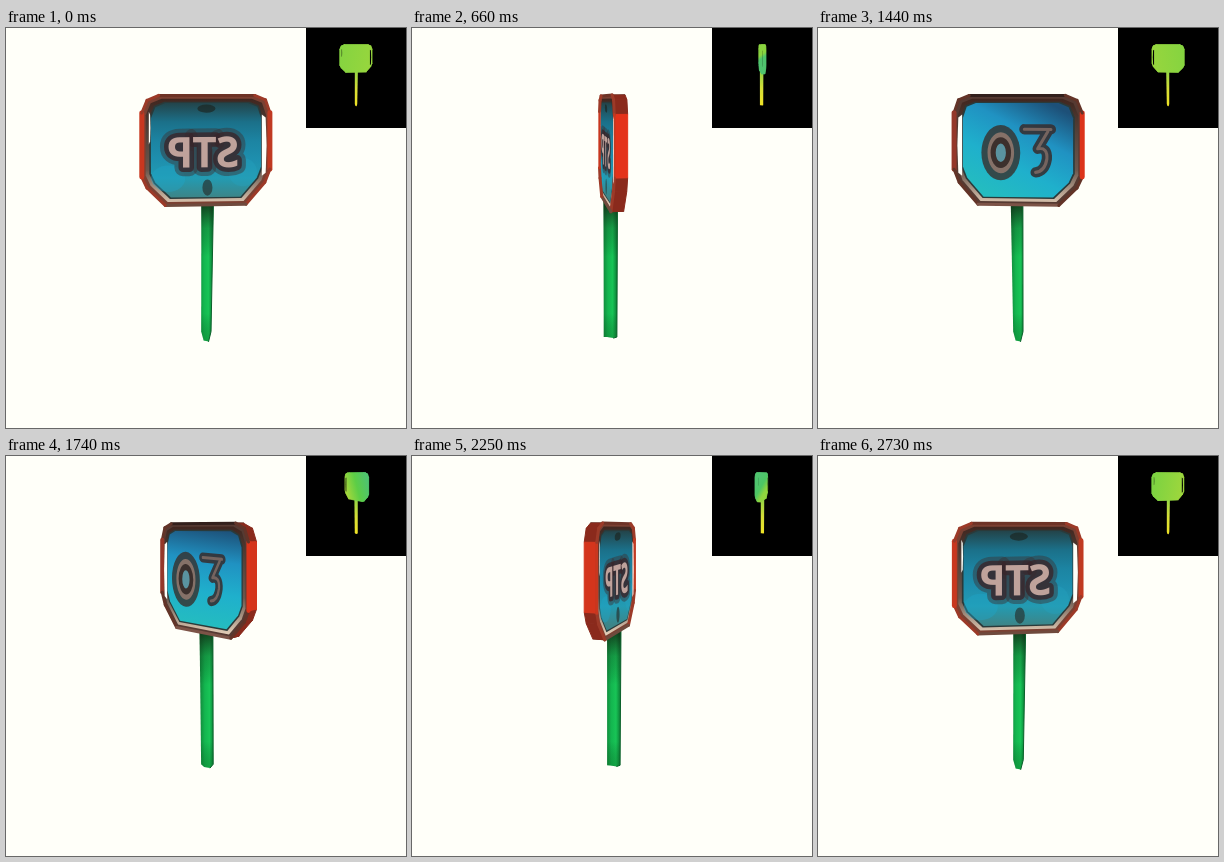
Animation, 400 px wide and 400 px high, one loop 2760 ms. Source, as an HTML page with a canvas:

```html
<!DOCTYPE html>
<html lang="en">
<head>
<meta charset="utf-8">
<title>Turning sign</title>
<style>
html, body { margin: 0; width: 100%; height: 100%; overflow: hidden; background: #fffff9; }
canvas { display: block; width: 100vw; height: 100vh; }
</style>
</head>
<body>
<canvas id="stage" width="400" height="400"></canvas>
<script>
const ctx = document.getElementById('stage').getContext('2d');
const LOOP = 2760, STEP = 30, PAPER = '#fffff9';
const DISTANCE = 490, TILT = 0.1, THICK = 6, CENTER = { x: 200, y: 121.5 };

// Unit outline, clockwise from the left end of the top edge.
const OUTLINE = [
  [-.74, -1], [.76, -1], [.93, -.92], [1, -.68], [1, .36], [.92, .6],
  [.62, 1], [-.64, 1], [-.92, .68], [-1, .48], [-1, -.68], [-.92, -.91],
];
// Edge colours: top, right, bottom, left, and the corners between them.
const WALLS = { edges: ['#3d2019', '#e4321a', '#5a3026', '#d4351c'], corner: '#8a2a1c' };
const FRONT_FRAME = { edges: ['#6e3326', '#c03a22', '#6f4a3d', '#c8371f'], corner: '#9c3a28' };
const BACK_FRAME = { edges: ['#33201c', '#94382a', '#7c5347', '#dc341a'], corner: '#633428' };
const edgeColor = (palette, i) => i % 3 ? palette.corner : palette.edges[i / 3];

let cos, sin, half;

function setPose(time) {
  const angle = time / LOOP * 2 * Math.PI - 0.07;
  cos = Math.cos(angle);
  sin = Math.sin(angle);
  half = 57.5 + 6 * cos ** 6;
}

// u runs along the panel, v down, w out of its front.
function project(u, v, w) {
  const x = u * cos - w * sin, z = u * sin + w * cos;
  const k = DISTANCE / (DISTANCE - z);
  return [CENTER.x + x * k, CENTER.y + (v + z * TILT) * k, z];
}

const outline = (w, size = 1) =>
  OUTLINE.map(([u, v]) => project(u * half * size, v * 54 * size, w));

function trace(points) {
  ctx.beginPath();
  points.forEach(([x, y]) => ctx.lineTo(x, y));
  ctx.closePath();
}

function fill(points, color) {
  trace(points);
  ctx.fillStyle = color;
  ctx.fill();
}

function line(points, color, width) {
  ctx.beginPath();
  points.forEach(([x, y]) => ctx.lineTo(x, y));
  ctx.strokeStyle = color;
  ctx.lineWidth = width;
  ctx.stroke();
}

function blend(x0, y0, x1, y1, colors) {
  const g = ctx.createLinearGradient(x0, y0, x1, y1);
  colors.forEach((c, i) => g.addColorStop(i / (colors.length - 1), c));
  return g;
}

function blot(x, y, rx, ry, color) {
  ctx.fillStyle = color;
  ctx.beginPath();
  ctx.ellipse(x, y, rx, ry, 0, 0, 7);
  ctx.fill();
}

// Draw in flat panel coordinates; side is 1 for the front, -1 for the back.
function onPanel(side, w, paint) {
  const [x, y] = project(0, 0, w), right = project(side, 0, w), down = project(0, 1, w);
  ctx.save();
  ctx.transform(right[0] - x, right[1] - y, down[0] - x, down[1] - y, x, y);
  paint();
  ctx.restore();
}

function poleShape() {
  const edge = Math.abs(sin), x = 200 - 1.7 * sin, lean = 1.3 * cos;
  const top = 6 + edge, bottom = 4.8 + 1.8 * edge;
  const tip = 310 + 3.5 * cos * cos, shoulder = tip - 1 - 9 * cos ** 4;
  return [[x - top + lean, 172], [x + top + lean, 172], [x + bottom, shoulder],
    [x + bottom * .5, tip], [x - bottom * .5, tip - 1], [x - bottom, shoulder]];
}

function drawPole() {
  const shape = poleShape(), x = 200 - 1.7 * sin;
  fill(shape, blend(x - 7, 0, x + 7, 0, ['#128a3c', '#13b64f', '#18c456', '#0b7a34']));
  fill(shape, blend(0, 172, 0, 314, ['#10200fe8', '#12351b44', '#0000', '#0000', '#0000', '#0a601c55']));
  line(shape.slice(1, 4), '#0a612a', 1);
}

function frontArt() {
  blot(0, -41, 9, 4, '#1c2420aa');
  blot(-38, 28, 17, 13, '#1fa6c866');
  blot(36, 22, 14, 14, '#25a2c055');
  blot(1, 37, 5, 8, '#26312daa');
  ctx.scale(-1, 1);
  ctx.font = 'bold 42px "Open Sans", sans-serif';
  ctx.letterSpacing = '-1px';
  ctx.textAlign = 'center';
  const lettering = [['#3a333577', 17], ['#38262acc', 9]];
  for (const [color, width] of lettering) {
    ctx.strokeStyle = color;
    ctx.lineWidth = width;
    ctx.strokeText('STP', 3, 17);
  }
  ctx.fillStyle = '#bfa29b';
  ctx.fillText('STP', 3, 17);
}

function backArt() {
  blot(-16, 2, 19, 27, '#38302ccc');
  blot(-16, 2, 13, 20, '#857168');
  blot(-16, 2, 10, 15, '#3c302d');
  blot(-16, 2, 5, 9, '#5a93a0');
  const numeral = new Path2D('M7 -21H33M30 -19L20 -2Q30 -4 29 8Q27 20 18 21');
  ctx.lineCap = 'round';
  ctx.strokeStyle = '#372e2fdd';
  ctx.lineWidth = 10;
  ctx.stroke(numeral);
  ctx.strokeStyle = '#75645f';
  ctx.lineWidth = 3;
  ctx.stroke(numeral);
}

// Open slits between the panel and its side bars.
function drawSlits(w, color) {
  const slit = (u, from, to, width) =>
    fill([project(u - width, from, w), project(u + width * .6, from + 3, w),
      project(u + width, (from + to) / 2, w), project(u + width * .6, to - 3, w),
      project(u - width, to, w)], color);
  slit(half * .91, -35, 26, 2.4);
  if (w > 0) slit(-half * .88, -38, -6, .8);
}

function drawFace(side) {
  const w = side * THICK, rim = outline(w), field = outline(w, .86);
  const front = side > 0;
  fill(rim, front ? '#7a4032' : '#563a32');
  fill(outline(w, .94), blend(0, 70, 0, 178, ['#40261f', '#54423a', '#6a564c', '#e2cdb7']));
  fill(outline(w, .885), '#2a3a3a');
  const xs = field.map(([x]) => x), left = Math.min(...xs), right = Math.max(...xs);
  fill(field, front
    ? blend(0, 75, 0, 169, ['#23444a', '#1b7089', '#1c84a2', '#1e8fae', '#239bb2', '#3c8588'])
    : blend(left + 30, 168, right - 30, 72, ['#24bcc0', '#1fb0cc', '#2092c2', '#1d5078']));

  ctx.save();
  trace(outline(w, .9));
  ctx.clip();
  onPanel(side, front ? w : w - 6, front ? frontArt : backArt);
  ctx.restore();

  const palette = front ? FRONT_FRAME : BACK_FRAME;
  rim.forEach((p, i) => {
    const upright = i % 6 === 3;
    line([p, rim[(i + 1) % rim.length]], edgeColor(palette, i), upright ? 2 + 3 * Math.abs(cos) : 3);
  });
  drawSlits(w, PAPER);
}

function wallQuads() {
  const a = outline(THICK), b = outline(-THICK);
  return a.map((p, i) => {
    const j = (i + 1) % a.length;
    return { points: [p, a[j], b[j], b[i]], color: edgeColor(WALLS, i), depth: p[2] + a[j][2] + b[j][2] + b[i][2] };
  }).sort((p, q) => p.depth - q.depth);
}

function drawSign() {
  for (const { points, color } of wallQuads()) {
    fill(points, color);
    line([...points, points[0]], color, 1);
  }
  if (Math.abs(cos) * DISTANCE > THICK) drawFace(Math.sign(cos));
}

function depthColor(z) {
  const near = Math.min(1, Math.max(-.15, z / 60 + sin * sin));
  return `hsl(${88 + 48 * near} ${64 - 14 * near}% 54%)`;
}

function drawDepthMap() {
  ctx.fillStyle = '#000';
  ctx.fillRect(300, 0, 100, 100);
  ctx.save();
  ctx.translate(300, 0);
  ctx.scale(.25, .25);
  fill(poleShape(), blend(0, 172, 0, 312, ['#91d445', '#d5de37', '#f0e326']));
  const ends = [project(-half, 0, 0), project(half, 0, 0)];
  const shade = blend(ends[0][0], 110, ends[1][0], 132,
    [depthColor(ends[0][2]), depthColor(0), depthColor(ends[1][2])]);
  const shapes = [...wallQuads().map(quad => quad.points), outline(-THICK), outline(THICK)];
  for (const shape of shapes) {
    fill(shape, shade);
    line([...shape, shape[0]], shade, 2);
  }
  drawSlits(Math.sign(cos) * THICK, '#000');
  ctx.restore();
}

function render(now) {
  setPose(Math.floor(now % LOOP / STEP) * STEP);
  ctx.fillStyle = PAPER;
  ctx.fillRect(0, 0, 400, 400);
  ctx.lineJoin = ctx.lineCap = 'round';
  drawPole();
  drawSign();
  drawDepthMap();
}

let start;
function tick(now) {
  start ??= now;
  render(now - start);
  requestAnimationFrame(tick);
}
render(0);
requestAnimationFrame(tick);
</script>
</body>
</html>
```
